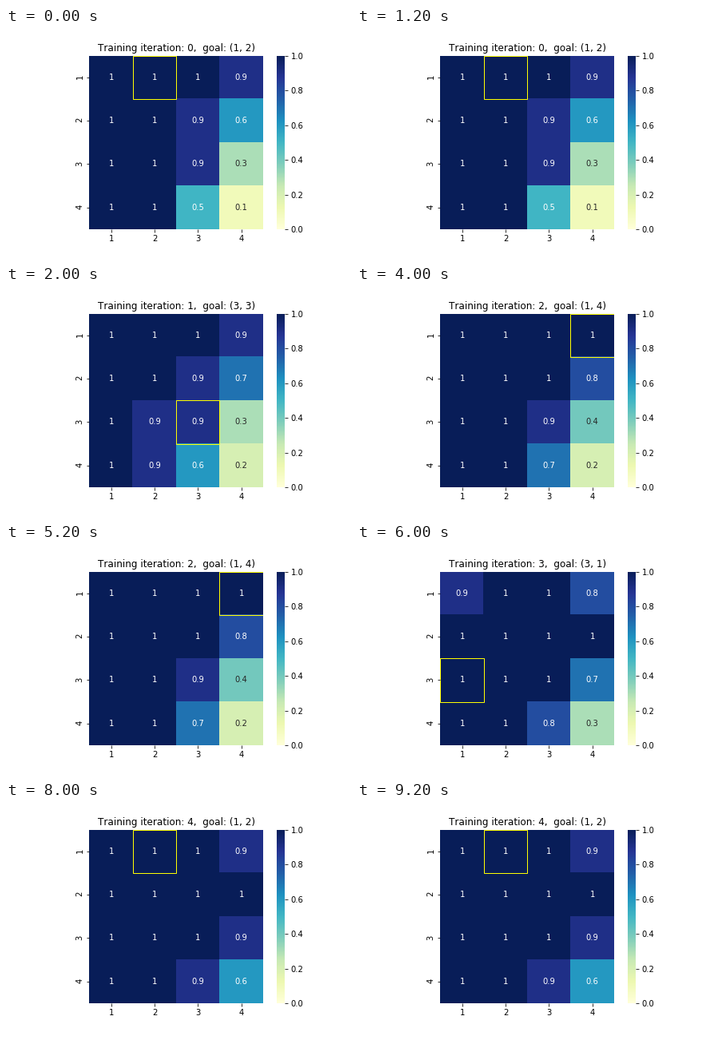
Write a matplotlib script that moves like this. It is 432 px wide and 288 px high and loops after 10000 ms.

```python
import numpy as np
import matplotlib.pyplot as plt
from matplotlib.animation import FuncAnimation
from matplotlib.patches import Rectangle

W, H, DPI = 432, 288, 72
SIDE, LEFT, BOTTOM = 217.44, 104.4, 36

# Cell values in tenths, one string per row (T = ten)
GRIDS = [
    ("TTT9", "TT96", "TT93", "TT51"),
    ("TTT9", "TT97", "T993", "T962"),
    ("TTTT", "TTT8", "TT94", "TT72"),
    ("9TT8", "TTTT", "TTT7", "TT83"),
    ("TTT9", "TTTT", "TTT9", "TT96"),
]
GOALS = [(1, 2), (3, 3), (1, 4), (3, 1), (1, 2)]


def values(rows):
    return np.array([[10 if c == "T" else int(c) for c in r] for r in rows]) / 10


plt.rcParams.update({
    "font.family": "DejaVu Sans",
    "font.size": 10,
    "text.kerning_factor": 6,
})
fig = plt.figure(figsize=(W / DPI, H / DPI), dpi=DPI, facecolor="white")
ax = fig.add_axes([LEFT / W, BOTTOM / H, SIDE / W, SIDE / H])
cax = fig.add_axes([338.58 / W, BOTTOM / H, SIDE / 20 / W, SIDE / H])

mesh = ax.pcolormesh(values(GRIDS[0]), cmap="YlGnBu", vmin=0, vmax=1, snap=False)
ax.set(xlim=(0, 4), ylim=(4, 0))
ax.spines[:].set_visible(False)
centers = np.arange(4) + 0.5
ax.set_xticks(centers, list("1234"))
ax.set_yticks(centers, list("1234"), rotation="vertical")
title = ax.set_title("", fontsize=12)

bar = fig.colorbar(mesh, cax=cax, ticks=np.linspace(0, 1, 6))
bar.outline.set_linewidth(0)

labels = [[ax.text(x, y, "", ha="center", va="center") for x in centers]
          for y in centers]
marker = ax.add_patch(Rectangle((0, 0), 1, 1, fill=False, ec="yellow", lw=1))


def draw(i):
    grid = values(GRIDS[i])
    mesh.set_array(grid)
    for row, line in zip(grid, labels):
        for v, label in zip(row, line):
            label.set_text(f"{v:.2g}")
            label.set_color("white" if v > 0.45 else "0.15")
    row, col = GOALS[i]
    marker.set_xy((col - 1, row - 1))
    title.set_text(f"Training iteration: {i},  goal: {GOALS[i]}")
    return [mesh, marker, title]


anim = FuncAnimation(fig, draw, frames=5, interval=2000, repeat=True,
                     repeat_delay=0, blit=False)
plt.show()
```
